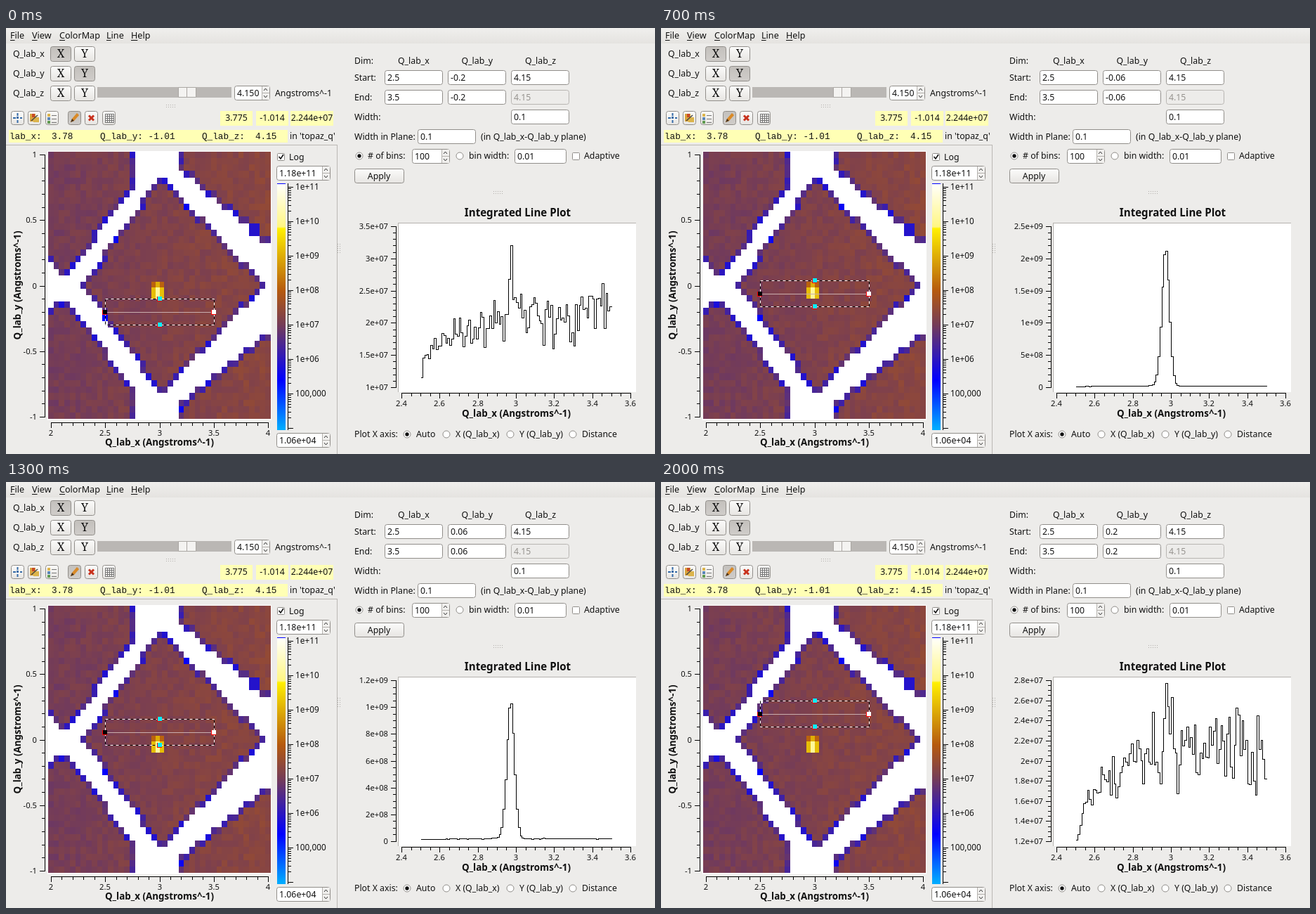
An HTML page with a canvas for the animation above (2100 ms loop, 924 px wide and 606 px high).

```html
<!DOCTYPE html>
<html lang="en">
<head>
<meta charset="utf-8">
<title>Line integration viewer</title>
<style>
html, body { margin: 0; width: 100%; height: 100%; overflow: hidden; background: #edecea; }
canvas { display: block; }
</style>
</head>
<body>
<canvas id="stage" width="924" height="606"></canvas>
<script>
const g = document.getElementById('stage').getContext('2d');
const SANS = '"Noto Sans", "Open Sans", sans-serif';
const UI = '12.3px ' + SANS, SMALL = '11.2px ' + SANS, BOLD = 'bold 13.4px ' + SANS;
const MONO = '12.7px "Liberation Mono", monospace', SERIF = '16px "Noto Serif", serif';
const INK = '#111', EDGE = '#918e8a', BG = '#edecea';

const rect = (x, y, w, h, color) => { g.fillStyle = color; g.fillRect(x, y, w, h); };
const hLine = (x1, x2, y, color = '#000') => rect(x1, y, x2 - x1 + 1, 1, color);
const vLine = (x, y1, y2, color = '#000') => rect(x, y1, 1, y2 - y1 + 1, color);
const clamp = v => Math.min(1, Math.max(0, v));
const mix = (a, b, f) => a + (b - a) * f;

function text(s, x, y, font = UI, align = 'left', color = INK) {
  g.font = font; g.textAlign = align; g.fillStyle = color;
  g.fillText(s, x, y);
}
function path(points, color, width = 1, fill) {
  g.beginPath();
  points.forEach(([x, y]) => g.lineTo(x, y));
  if (fill) { g.fillStyle = color; g.fill(); return; }
  g.strokeStyle = color; g.lineWidth = width; g.stroke();
}
function round(x, y, w, h, fill, stroke = EDGE, r = 3) {
  g.beginPath(); g.roundRect(x + .5, y + .5, w - 1, h - 1, r);
  g.fillStyle = fill; g.fill();
  g.strokeStyle = stroke; g.lineWidth = 1; g.stroke();
}
function shade(y, h, from, to) {
  const fill = g.createLinearGradient(0, y, 0, y + h);
  fill.addColorStop(0, from);
  fill.addColorStop(1, to);
  return fill;
}
function field(x, y, w, s, off) {
  round(x, y, w, 21, off ? BG : '#fff', off ? '#b8b5b2' : EDGE);
  text(s, x + 4, y + 15, UI, 'left', off ? '#96938f' : INK);
}
function spin(x, y, w, s) {
  field(x, y, w, s);
  const r = x + w - 12;
  rect(r, y + 1, 11, 19, '#f1f0ee');
  vLine(r, y + 1, y + 19, '#b5b2ae');
  hLine(r, r + 10, y + 10, '#b5b2ae');
  path([[r + 3, y + 7], [r + 5.5, y + 4], [r + 8, y + 7]], '#333');
  path([[r + 3, y + 14], [r + 5.5, y + 17], [r + 8, y + 14]], '#333');
}
function button(x, y, w, h, down) {
  round(x, y, w, h, down ? shade(y, h, '#c3c0bc', '#d0cdca') : shade(y, h, '#fcfcfb', '#e6e4e1'));
}
function radio(x, y, on) {
  g.beginPath(); g.arc(x, y, 5, 0, 7);
  g.fillStyle = '#fff'; g.fill();
  g.strokeStyle = EDGE; g.lineWidth = 1; g.stroke();
  if (on) { g.beginPath(); g.arc(x, y, 2.7, 0, 7); g.fillStyle = INK; g.fill(); }
}
function check(x, y, on) {
  round(x, y, 11, 11, '#fff', EDGE, 1);
  if (on) path([[x + 2.5, y + 5], [x + 5, y + 8], [x + 9, y + 2]], INK, 1.6);
}
function grip(x, y, down) {
  for (let i = 0; i < 5; i++)
    for (let j = 0; j < 2; j++)
      rect(x + (down ? j : i) * 3, y + (down ? i : j) * 3, 1, 1, '#b0ada9');
}

function random(a, b) {
  const s = Math.sin(a * 127.1 + b * 311.7) * 43758.5453;
  return s - Math.floor(s);
}

// Colour scale over log10 of the intensity
const STOPS = [
  [4, 0, 170, 255], [5.4, 0, 0, 255], [7, 116, 60, 88], [8, 182, 90, 14],
  [9.8, 255, 240, 0], [9.85, 255, 246, 130], [11.1, 255, 255, 252]
];
function heat(v) {
  const i = Math.max(1, STOPS.findIndex(s => s[0] >= v));
  const a = STOPS[i - 1], b = STOPS[i], f = clamp((v - a[0]) / (b[0] - a[0]));
  return `rgb(${[1, 2, 3].map(n => Math.round(mix(a[n], b[n], f)))})`;
}

// True where a detector panel covers the cell, false in the gaps
function covered(c, r) {
  const d = Math.abs(r - 20);
  const diamond = d < 17 && c >= Math.round(6 + d * .875) && c <= Math.round(39 - d * 1.15);
  const upperLeft = r < 19 && c < 16 && c <= Math.round(15 - (r - 5) * .93) && c >= r - 16;
  const lowerLeft = r > 22 && c < 16 && c <= Math.round(3 + (r - 23) * .93) && c >= 24 - r;
  const upperRight = c > 23 && r <= Math.round(2 + (c - 24) * .7);
  const lowerRight = c > 23 && r >= Math.round(38.4 - (c - 24) * .68);
  return diamond || upperLeft || lowerLeft || upperRight || lowerRight;
}
function drawMap() {
  rect(59, 175, 319, 383, '#fff');
  const px = c => Math.min(377, Math.round(60 + 7.73 * c)), py = r => Math.min(557, Math.round(175.5 + 9.29 * r));
  const gap = (c, r) => c >= 0 && c < 41 && r >= 0 && r < 41 && !covered(c, r);
  for (let r = 0; r < 41; r++) for (let c = 0; c < 41; c++) {
    if (!covered(c, r)) continue;
    const n = random(c + 1, r + 1);
    const rim = gap(c - 1, r) || gap(c + 1, r) || gap(c, r - 1) || gap(c, r + 1);
    const v = rim ? 5.3 + 1.5 * Math.sqrt(n) : 7.02 + c * .008 + (n - .5) * .26;
    rect(px(c), py(r), px(c + 1) - px(c), py(r + 1) - py(r), heat(v));
  }
  rect(px(37), py(11), px(39) - px(37), py(13) - py(11), heat(5.9));
  for (let i = 0; i < 3; i++) for (let j = 0; j < 3; j++)
    rect(207 + 6 * i, 361 + 8 * j, 6, 8, heat(10.1 - Math.abs(i - 1) * .9 - (j ? 0 : 1.1)));
}

function xAxis(left, right, y, lo, hi, step, minor) {
  const n = Math.round((hi - lo) / minor), every = Math.round(step / minor);
  hLine(left, right, y);
  for (let i = 0; i <= n; i++) {
    const x = Math.round(mix(left, right, i / n)), major = i % every === 0;
    vLine(x, y, y + (major ? 7 : 4));
    if (major) text(String(+(lo + i * minor).toFixed(2)), x, y + 19, SMALL, 'center');
  }
}
function yAxis(x, top, bottom, lo, hi, step, parts, format) {
  const n = Math.round((hi - lo) / step * parts);
  vLine(x, top, bottom);
  for (let i = 0; i <= n; i++) {
    const y = Math.round(mix(bottom, top, i / n)), major = i % parts === 0;
    hLine(x - (major ? 7 : 4), x, y);
    if (major) text(format(lo + i / parts * step), x - 11, y + 4, SMALL, 'right');
  }
}

function drawTools() {
  rect(0, 0, 924, 22, shade(0, 22, '#f0efed', '#e5e3e0'));
  [[6, 'File'], [37, 'View'], [76, 'ColorMap'], [143, 'Line'], [178, 'Help']].forEach(([x, s]) => {
    text(s, x, 15, '12.6px ' + SANS);
    hLine(x, x + g.measureText(s[0]).width - 1, 17, INK);
  });
  ['x', 'y', 'z'].forEach((axis, i) => {
    const y = 26 + 28 * i;
    text('Q_lab_' + axis, 10, y + 15);
    button(63, y, 30, 22, i === 0);
    button(97, y, 30, 22, i === 1);
    text('X', 78, y + 16, SERIF, 'center');
    text('Y', 112, y + 16, SERIF, 'center');
  });
  rect(130, 84, 191, 15, '#bab7b4');
  round(245, 84, 26, 15, '#f4f3f1', '#aaa7a3', 0);
  vLine(257, 85, 97, '#aaa7a3');
  spin(325, 82, 51, '4.150');
  text('Angstroms^-1', 383, 97);
  grip(228, 109); grip(694, 232); grip(472, 307, true);

  [7, 31, 56, 88, 112, 137].forEach((x, i) => button(x, 118, 19, 20, i === 3));
  path([[16.5, 121], [16.5, 135]], '#356ba8', 2);
  path([[10, 128], [23, 128]], '#356ba8', 2);
  rect(14, 125, 6, 6, '#f6f5f4'); rect(15, 126, 3, 3, '#356ba8');
  rect(34, 122, 8, 11, '#d9a43b'); rect(37, 122, 4, 5, '#c84a28');
  rect(39, 127, 8, 7, '#dcb44c'); path([[36, 132], [45, 124]], '#4a4640', 1.5);
  ['#dcb44c', '#5a86b8', '#5f9a50'].forEach((color, i) => {
    rect(59, 122 + 5 * i, 4, 4, color);
    hLine(65, 71, 124 + 5 * i, '#777');
  });
  path([[92, 134], [94, 129], [101, 121], [104, 124], [97, 132]], '#d98a28', 1, true);
  path([[92, 134], [94, 129], [97, 132]], '#4a3520', 1, true);
  path([[118, 124.5], [125, 131.5]], '#c8321e', 3);
  path([[125, 124.5], [118, 131.5]], '#c8321e', 3);
  for (let i = 0; i < 5; i++) {
    hLine(141, 153, 122 + 3 * i, '#777');
    vLine(141 + 3 * i, 122, 134, '#777');
  }

  const YELLOW = '#ffffb5';
  [[305, 46, '3.775'], [356, 46, '-1.014'], [405, 61, '2.244e+07']].forEach(([x, w, s]) => {
    rect(x, 118, w, 21, YELLOW);
    text(s, x + w / 2, 132, UI, 'center');
  });
  rect(4, 145, 397, 18, YELLOW);
  [[5, 'lab_x:'], [65, '3.78'], [134, 'Q_lab_y: -1.01'], [279, 'Q_lab_z:'], [355, '4.15']]
    .forEach(([x, s]) => text(s, x, 158, MONO));
  text("in 'topaz_q'", 404, 158);
  hLine(0, 471, 166, '#bbb8b4'); vLine(471, 166, 605, '#bbb8b4');
}

function drawScale() {
  check(386, 178, true);
  text('Log', 403, 188);
  spin(385, 196, 77, '1.18e+11');
  spin(385, 576, 77, '1.06e+04');
  for (let y = 221; y < 572; y++) rect(386, y, 12, 1, heat(11 - (y - 226) / 49));
  vLine(401, 221, 571);
  for (let e = 4; e < 12; e++) for (let m = 1; m < 10; m++) {
    const y = Math.round(226 + (11 - e - Math.log10(m)) * 49);
    if (y < 221 || y > 571) continue;
    hLine(401, m === 1 ? 408 : 405, y);
    if (m === 1 && e > 4)
      text(e === 5 ? '100,000' : '1e+' + String(e).padStart(2, '0'), 412, y + 4, '11.8px ' + SANS);
  }
}

function drawForm(y) {
  text('Dim:', 496, 51);
  ['x', 'y', 'z'].forEach((a, i) => text('Q_lab_' + a, 558 + 90.5 * i, 51));
  [['Start:', '2.5'], ['End:', '3.5']].forEach(([label, x], i) => {
    const top = 60 + 28 * i;
    text(label, 496, top + 15);
    [x, y, '4.15'].forEach((s, n) => field(539 + 90 * n, top, 83, s, i === 1 && n === 2));
  });
  text('Width:', 496, 131); field(719, 116, 83, '0.1');
  text('Width in Plane:', 496, 159); field(586, 144, 83, '0.1');
  text('(in Q_lab_x-Q_lab_y plane)', 676, 159);
  radio(503, 182, true); text('# of bins:', 515, 186); spin(578, 172, 54, '100');
  radio(646, 182); text('bin width:', 659, 186); field(724, 172, 74, '0.01');
  check(806, 177); text('Adaptive', 823, 186);
  button(496, 200, 71, 21); text('Apply', 531, 215, UI, 'center');
  text('Plot X axis:', 496, 582);
  [[571, 'Auto'], [627, 'X (Q_lab_x)'], [718, 'Y (Q_lab_y)'], [807, 'Distance']]
    .forEach(([x, s], i) => { radio(x, 578, i === 0); text(s, x + 13, 582); });
}

// Share of the bright peak lying below height y
const passed = y => clamp((y + .087) / .09);

// Intensities along the line: rising noisy background, small ridge, bright peak
function profile(y) {
  const far = clamp((y - .14) / .06), near = clamp((y + .2) / .34);
  const first = mix(mix(1.2, 1.55, near), 1.16, far);
  const ridge = mix(mix(3.2, 2.83, near), 2.77, far);
  const amp = 212 * (passed(y + .1) - passed(y - .1));
  const row = (y + .2) * 10, low = Math.floor(row);
  const noise = (b, n) => random(b + 3, n + 7) + random(b + 11, n + 29) - 1;
  return Array.from({ length: 100 }, (_, b) => {
    const grow = Math.min(1, b / 45);
    const trend = 1.66 + .44 * grow - (1.66 - first) * Math.exp(-b / 3);
    const level = trend + (.12 + .43 * grow) * mix(noise(b, low), noise(b, low + 1), row - low);
    const base = mix(level, ridge, Math.exp(-((b - 47) ** 2)));
    const peak = Math.exp(-(((b - 46.6) / 2.75) ** 2)) + .04 * Math.exp(-Math.abs(b - 43) / 2);
    return 1e7 * (base + amp * peak);
  });
}
function power(v) {
  return Math.abs(v) < 1 ? '0' : (+v.toPrecision(3)).toExponential().replace(/\+(\d)$/, '+0$1');
}

function drawPlot(y) {
  const data = profile(y), min = Math.min(...data), max = Math.max(...data);
  const raw = (max - min) / 8, unit = 10 ** Math.floor(Math.log10(raw));
  const digit = [1, 2, 5, 10].find(m => m * unit >= raw), step = digit * unit;
  const lo = Math.floor(min / step) * step, hi = Math.ceil(max / step) * step;

  text('Integrated Line Plot', 728.5, 268, 'bold 15.1px ' + SANS, 'center');
  rect(558, 277, 339, 241, '#fff');
  hLine(558, 896, 277, '#b5b2ae'); vLine(558, 277, 517, '#b5b2ae');
  yAxis(555, 282, 511, lo, hi, step, digit === 2 ? 4 : 5, power);
  xAxis(563, 889, 519, 2.4, 3.6, .2, .05);
  text('Q_lab_x (Angstroms^-1)', 726.5, 553, BOLD, 'center');

  const px = b => Math.round(590.5 + 2.713 * b);
  const py = v => Math.round(mix(511, 282, (v - lo) / (hi - lo)));
  data.forEach((v, b) => {
    const at = py(v), from = b ? py(data[b - 1]) : at;
    hLine(px(b), px(b + 1), at);
    vLine(px(b), Math.min(at, from), Math.max(at, from));
  });
}

function drawSelection(y) {
  const mid = Math.round(366.8 - 186.5 * y), top = mid - 19, bottom = mid + 18;
  hLine(141, 296, mid, '#c9adad');
  g.lineWidth = 1;
  [['#000', []], ['#fff', [4, 4]]].forEach(([color, dash]) => {
    g.setLineDash(dash); g.strokeStyle = color;
    g.strokeRect(141.5, top + .5, 155, bottom - top);
  });
  g.setLineDash([]);
  [[141, mid, '#000'], [296, mid, '#fff'], [219, top, '#00eeff'], [219, bottom, '#00eeff']]
    .forEach(([x, h, color]) => {
      rect(x - 4, h - 3, 7, 7, '#f00');
      rect(x - 3, h - 3, 6, 6, color);
    });
}

function draw(k) {
  const y = (k - 10) / 50;
  rect(0, 0, 924, 606, BG);
  drawTools();
  drawMap();
  drawSelection(y);
  yAxis(55, 180, 553, -1, 1, .5, 5, String);
  xAxis(64, 373, 561, 2, 4, .5, .1);
  text('Q_lab_x (Angstroms^-1)', 218.5, 594, BOLD, 'center');
  g.save();
  g.translate(21, 366); g.rotate(-Math.PI / 2);
  text('Q_lab_y (Angstroms^-1)', 0, 0, BOLD, 'center');
  g.restore();
  drawScale();
  drawForm(String(y));
  drawPlot(y);
}

let shown = -1;
const start = performance.now();
function tick() {
  const k = Math.floor((performance.now() - start) % 2100 / 100);
  if (k !== shown) draw(shown = k);
  requestAnimationFrame(tick);
}
tick();
</script>
</body>
</html>
```
